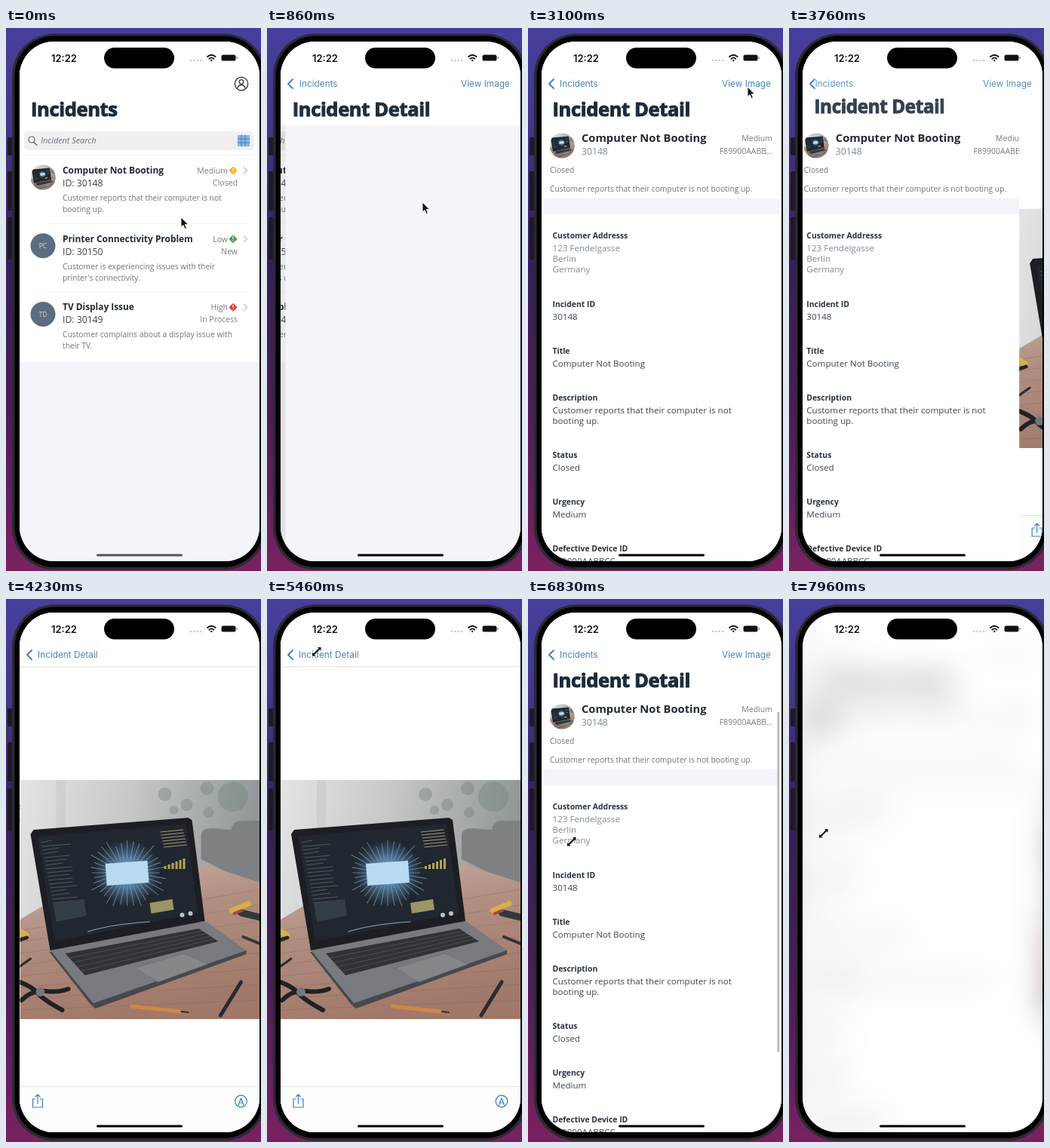
Animation of 338 by 720 pixels, one loop 8000 ms. Source, as an HTML page:

```html
<!DOCTYPE html>
<html lang="en">
<head>
<meta charset="utf-8">
<title>Incidents app</title>
<style>
html, body { margin: 0; width: 100%; height: 100%; overflow: hidden; background: #2c1b4e; }
svg { display: block; width: 100%; height: 100%; }
text { font-family: "Open Sans", "Noto Sans", sans-serif; fill: #3a4450; white-space: pre; }
.big { font-size: 25.6px; font-weight: 700; letter-spacing: -.4px; fill: #1d2b3a; stroke: #1d2b3a; stroke-width: 1px; }
.name { font-size: 11.9px; font-weight: 700; fill: #1f2b38; }
.head { font-size: 14.7px; font-weight: 700; fill: #1f2b38; }
.id { font-size: 12.2px; }
.small { font-size: 10.3px; fill: #6c747c; }
.side { font-size: 10.5px; fill: #737b83; text-anchor: end; }
.label { font-size: 10.4px; font-weight: 700; fill: #27323e; }
.value { font-size: 11.6px; }
.muted { fill: #7b8997; }
.search { font-size: 10.9px; font-style: italic; fill: #6a7078; }
.init { font-size: 8.5px; fill: #d3dae2; text-anchor: middle; }
.link { font: 11.8px Inter, sans-serif; fill: #4583ba; }
.clock { font: 600 13px Inter, sans-serif; fill: #111; }
.line { fill: none; stroke-linecap: round; stroke-linejoin: round; }
</style>
</head>
<body>
<svg id="stage" viewBox="0 0 338 720" preserveAspectRatio="none"></svg>
<script>
const svg = document.getElementById('stage');
const text = (x, y, cls, s) => `<text x="${x}" y="${y}" class="${cls}">${s}</text>`;
const rect = (x, y, w, h, fill, more = '') => `<rect x="${x}" y="${y}" width="${w}" height="${h}" fill="${fill}" ${more}/>`;
const circle = (x, y, r, fill, more = '') => `<circle cx="${x}" cy="${y}" r="${r}" fill="${fill}" ${more}/>`;
const poly = (points, fill, more = '') => `<polygon points="${points}" fill="${fill}" ${more}/>`;
const line = (d, color, w, more = '') => `<path class="line" d="${d}" stroke="${color}" stroke-width="${w}" ${more}/>`;
const group = (id, body, more = '') => `<g id="${id}" ${more}>${body}</g>`;

let seed = 7;
const random = () => (seed = seed * 16807 % 2147483647) / 2147483647;

function photo() {
  let s = rect(18, 240, 318, 317, 'url(#wall)') + rect(66, 240, 12, 120, '#c3c7c9', 'opacity=".5"');
  for (const [x, y, r] of [[210, 259, 9], [239, 273, 8], [266, 251, 9], [268, 283, 7], [300, 262, 20], [222, 280, 6]])
    s += circle(x, y, r, '#718277', 'opacity=".4"');
  s += '<path d="M258 345V314q0-10 14-10l26 2q2-12 14-12h24v90z" fill="#7d8184"/>';
  s += poly('18,425 60,400 262,352 336,376 336,557 18,557', 'url(#wood)');
  for (let i = 0; i < 9; i++)
    s += line(`M18 ${440 + i * 15}L336 ${385 + i * 21}`, '#7c5a4e', .7, 'opacity=".4"');
  s += poly('57,468 262,428 318,466 318,471 118,543 112,538', '#46484d');
  s += poly('57,464 262,426 318,466 115,536', '#787a7f');
  s += poly('78,470 255,437 281,454 104,499', '#303236');
  for (let i = 1; i < 5; i++)
    s += line(`M${78 + i * 5} ${470 + i * 6}L${255 + i * 5} ${437 + i * 3.4}`, '#5d6065', .6);
  s += poly('171,489 236,470 267,484 201,508', '#85878b', 'stroke="#696b70" stroke-width=".6"');
  s += poly('36,306 241,290 246,293 263,427 58,466 32,312', '#1c1e23');
  s += poly('41,315 238,298 254,416 64,454', '#20272e');
  const screen = [];
  for (let i = 0; i < 17; i++) {
    const x = 46 + i, y = 323 + i * 5;
    screen.push(line(`M${x} ${y}l${14 + random() * 26} -3`, '#8b959a', .8, 'opacity=".6"'));
  }
  for (let i = 0; i < 36; i++) {
    const a = i * Math.PI / 18, c = Math.cos(a), d = Math.sin(a), r = 42 + random() * 14;
    screen.push(line(`M${160 + c * 26} ${363 + d * 19}L${160 + c * r} ${363 + d * r * .85}`, '#8ba5b8', 1.1, 'opacity=".65"'));
  }
  for (let i = 0; i < 6; i++)
    screen.push(line(`M${204 + i} ${309 + i * 4}l30 -3`, '#a29a78', 1), rect(209 + i * 5, 354 - i * 2, 3, 4 + i * 2, '#b0a25a'));
  s += screen.join('');
  s += poly('190,403 220,398 222,412 192,417', '#9c9566') + poly('62,404 103,398 106,420 66,428', '#333f44');
  s += line('M108 441Q140 431 190 428', '#8ba3b1', 1.2) + circle(233, 419, 3, '#b8c0c6') + circle(244, 417, 3, '#b8c0c6');
  s += circle(160, 363, 44, 'url(#glow)') + rect(132, 349, 56, 29, '#b9daf3', 'transform="rotate(-4 160 363)"');
  s += line('M18 441l8 5', '#d9b04a', 8) + line('M18 452l9 -3', '#272525', 5) + line('M18 487l14 -10', '#2b2b2d', 3);
  s += line('M18 508Q34 514 42 523T74 545M20 532Q34 518 52 520T82 517', '#202124', 6) + circle(45, 521, 6, '#74777b');
  s += line('M166 540L230 547', '#cf8843', 5) + line('M232 547l9 1', '#3a302a', 2);
  s += line('M311 508L284 552', '#292b31', 5) + line('M311 416l25 6', '#33363b', 9);
  s += line('M299 413l22 -9', '#d6ae4a', 7) + line('M302 417l10 -4', '#a8483f', 4) + line('M314 448l22 9', '#33343a', 4);
  return s;
}

const avatar = (x, y) => `<g transform="translate(${x} ${y})"><g clip-path="url(#round)">
  <use href="#photo" transform="scale(.112) translate(-165 -400)"/></g></g>`;

function row(i, name, id, desc, urgency, color, status, initials) {
  return group('row' + i,
    (initials ? circle(49, 198, 16.5, '#5d6d81') + text(49, 201.5, 'init', initials) : avatar(49, 198)) +
    text(75, 193, 'name', name) + text(75, 210, 'id', 'ID: ' + id) +
    desc.map((d, k) => text(75, 229 + k * 15, 'small', d)).join('') +
    text(294, 193, 'side', urgency) + text(307, 209, 'side', status) +
    rect(297, 185, 8, 8, color, 'rx="1" transform="rotate(45 301 189)"') +
    line('M301 186v3M301 191.5v.2', '#fff', 1.2) + line('M315.5 185l4 4-4 4', '#b7bbc0', 1.2) +
    (i < 2 ? rect(55, 259, 268, .7, '#ededf0') : ''), `transform="translate(0 ${i * 90.7})"`);
}

const listBody = rect(18, 18, 318, 690, '#f4f4fb') + rect(18, 18, 318, 425, '#fff') +
  rect(24, 137, 305, 25, '#f0f0f1', 'rx="5"') + rect(18, 168, 318, .7, '#ededf0') +
  circle(34, 148, 4, 'none', 'stroke="#555c64" stroke-width="1.2"') + line('M37 151.5l4 4', '#555c64', 1.2) +
  text(46, 153, 'search', 'Incident Search') +
  rect(307, 142, 16, 15, '#8db6e8') + line('M307 147h16M307 152h16M312 142v15M317 142v15', '#3f7cc9', 1) +
  row(0, 'Computer Not Booting', 30148, ['Customer reports that their computer is not', 'booting up.'], 'Medium', '#efb52e', 'Closed') +
  row(1, 'Printer Connectivity Problem', 30150, ['Customer is experiencing issues with their', 'printer\'s connectivity.'], 'Low', '#4d9a4b', 'New', 'PC') +
  row(2, 'TV Display Issue', 30149, ['Customer complains about a display issue with', 'their TV.'], 'High', '#dc4234', 'In Process', 'TD') +
  rect(18, 18, 318, 690, '#000', 'id="listDim"');

const fields = [
  [279, 'Customer Addresss', ['123 Fendelgasse', 'Berlin', 'Germany'], 'muted'],
  [370, 'Incident ID', ['30148']],
  [432, 'Title', ['Computer Not Booting']],
  [494, 'Description', ['Customer reports that their computer is not', 'booting up.']],
  [570, 'Status', ['Closed']],
  [632, 'Urgency', ['Medium']],
  [694, 'Defective Device ID', ['F89900AABBCC']]
].map(([y, label, lines, cls = '']) => text(32.5, y, 'label', label) +
  lines.map((s, k) => text(32.5, y + 16.5 + k * 14.4, 'value ' + cls, s)).join('')).join('');

const detailBody = rect(18, 18, 318, 690, '#f4f4fb') + group('record',
  rect(18, 18, 318, 690, '#fff') + avatar(45, 156) +
  text(71, 151, 'head', 'Computer Not Booting') + text(71, 168, 'id muted', '30148') +
  text(324, 150, 'side', 'Medium') + text(324, 166.5, 'side', 'F89900AABB...') +
  text(29, 192, 'small', 'Closed') + text(29, 217, 'small', 'Customer reports that their computer is not booting up.') +
  rect(21, 226, 312, 21, '#f3f3fa') + fields + rect(330.5, 150, 2.5, 451, '#b4b4b8', 'rx="1.2" id="scrollbar"'));

const blue = '#3c7cc4';
const photoBody = rect(18, 18, 318, 690, '#fff') + rect(18, 89.5, 318, .8, '#dcdce0') +
  group('photo', photo(), 'clip-path="url(#picture)"') + rect(18, 646, 318, 62, '#fdfdfd') + rect(18, 646, 318, .8, '#dcdce0') +
  line('M38 663h-3v11h13v-11h-3M41.5 669v-12M38.5 660l3-3 3 3', blue, 1.2) +
  circle(311, 666, 7.8, 'none', `stroke="${blue}" stroke-width="1.2"`) + line('M307.5 671l3.5-9 3.5 9M309 668h4', blue, 1.2);

const nav = rect(18, 18, 318, 111, '#fff', 'id="navBar"') +
  group('listTitle', text(0, 0, 'big', 'Incidents')) +
  group('person', circle(312, 74, 8.7, 'none', 'stroke="#34404e" stroke-width="1.4"') +
    circle(312, 71.5, 2.8, 'none', 'stroke="#34404e" stroke-width="1.3"') + line('M307 79.5q1-4 5-4t5 4', '#34404e', 1.3)) +
  group('detailTitle', text(0, 0, 'big', 'Incident Detail')) +
  group('backToList', text(42, 78, 'link', 'Incidents')) +
  group('viewImage', text(257, 78, 'link', 'View Image')) +
  group('backToDetail', text(42, 78, 'link', 'Incident Detail')) +
  group('chevron', line('M34 68l-6 6 6 6', blue, 1.8));

const status = text(60, 44.5, 'clock', '12:22') + rect(130, 26, 93, 27.5, '#000', 'rx="13.7"') +
  [0, 1, 2, 3].map(i => circle(245 + i * 4.4, 43, 1.2, '#c3c3c6')).join('') +
  line('M267 38q5.3-4.6 10.6 0M269.3 40.7q3-2.6 6 0', '#111', 1.8) + circle(272.3, 43, 1.2, '#111') +
  rect(285.5, 35.5, 19, 8, '#111', 'rx="2.6"') + rect(305.5, 38, 1.3, 3, '#888', 'rx=".6"') +
  rect(120, 697.5, 114, 3, '#000', 'rx="1.5" id="home"');

svg.innerHTML = `<defs>
  <linearGradient id="desk" x2="0" y2="1"><stop stop-color="#463f9c"/><stop offset=".18" stop-color="#423689"/>
    <stop offset=".42" stop-color="#34205c"/><stop offset=".7" stop-color="#4a1d55"/><stop offset="1" stop-color="#7a2260"/></linearGradient>
  <linearGradient id="wall" y2=".2"><stop stop-color="#e2e4e5"/><stop offset=".45" stop-color="#c6c9ca"/><stop offset="1" stop-color="#8f9496"/></linearGradient>
  <linearGradient id="wood" x2=".3" y2="1"><stop stop-color="#c9b3a8"/><stop offset=".45" stop-color="#b08e80"/><stop offset="1" stop-color="#a1796a"/></linearGradient>
  <radialGradient id="glow"><stop offset=".3" stop-color="#7db4e4" stop-opacity=".8"/><stop offset="1" stop-color="#4b7cab" stop-opacity="0"/></radialGradient>
  <clipPath id="screen"><rect x="18" y="18" width="318" height="689" rx="46"/></clipPath>
  <clipPath id="picture"><rect x="18" y="240" width="318" height="317"/></clipPath>
  <clipPath id="round"><circle r="16.5"/></clipPath></defs>` +
  rect(0, 0, 338, 720, 'url(#desk)') +
  [[145, 24], [190, 52], [251, 56]].map(([y, h]) => rect(2, y, 8, h, '#1d1a26', 'rx="2"')).join('') +
  rect(8, 7.5, 337, 711, '#2b2a33', 'rx="56"') +
  rect(11.5, 10.5, 330, 704.5, '#000', 'rx="53"') +
  `<g clip-path="url(#screen)">${rect(18, 18, 318, 690, '#fff')}` +
  group('app', group('list', listBody) + group('detail', detailBody) + group('photoPage', photoBody) + nav) +
  status + '</g>' +
  group('arrow', '<path d="M0 0v13l3-2.6 2.2 5 2.2-1-2.2-4.8h4.2z" fill="#111" stroke="#fff" stroke-width=".9"/>') +
  group('resize', '<path d="M6-6.5v6l-2-2L-2.500 4l2 2h-6V0l2 2L2-4.500l-2-2z" fill="#111" stroke="#fff" stroke-width=".9"/>');

const el = {};
svg.querySelectorAll('[id]').forEach(n => el[n.id] = n);

const clamp = v => Math.max(0, Math.min(1, v));
const mix = (a, b, p) => a + (b - a) * p;
const ramp = (t, a, b) => clamp((t - a) / (b - a));
const move = (id, x, y = 0, s = 1) => el[id].setAttribute('transform', `translate(${x} ${y}) scale(${s})`);
const fade = (id, o) => el[id].setAttribute('opacity', clamp(o));
const spring = ms => { const k = Math.max(0, ms) * .0174; return 1 - (1 + k) * Math.exp(-k); };

const pointer = [[0, 232, 251], [30, 232, 251], [520, 206, 231], [2060, 206, 231], [2900, 291, 78], [4660, 291, 78],
  [5400, 66, 70], [5900, 66, 70], [6650, 58, 322], [6850, 58, 322], [7230, 46, 311], [8000, 46, 311]];

function pointerAt(t) {
  const i = pointer.findIndex(k => k[0] > t), [t0, x0, y0] = pointer[i - 1], [t1, x1, y1] = pointer[i];
  const p = ramp(t, t0, t1), e = p * p * (3 - 2 * p);
  return [mix(x0, x1, e), mix(y0, y1, e)];
}

// Shrinks a large title into the back-button label.
const shrinkTitle = (id, x, p) => move(id, mix(x, 42, p), mix(117, 78, p), 1 - .54 * p);

function draw(t) {
  const opened = spring(t - 525);
  const held = t > 3760 && t < 4060 ? 3760 : t;
  const shown = t < 5525 ? spring(held - 3730) : 1 - spring(t - 5525);

  move('list', -98 * opened);
  fade('listDim', .08 * opened);
  move('detail', 318 * (1 - opened) - 95 * shown);
  move('photoPage', 318 * (1 - shown));
  fade('record', t >= 1250 ? 1 : 0);
  fade('scrollbar', t < 4000 ? 1 - ramp(t, 1500, 1740) : ramp(t, 6020, 6150) - ramp(t, 6950, 7160));

  el.navBar.setAttribute('height', 111 - 40 * shown);
  shrinkTitle('listTitle', 33, opened);
  fade('listTitle', 1 - opened * 1.6);
  fade('person', 1 - opened * 1.5);
  shrinkTitle('detailTitle', 32.5 + 60 * (1 - opened), shown);
  fade('detailTitle', opened * (1 - shown * 1.1));
  move('backToList', 40 * (1 - opened) - 78 * shown);
  fade('backToList', opened * opened * (1 - shown * 1.5));
  fade('viewImage', opened * (1 - shown) * (t > 3490 && t < 3730 ? .4 : 1));
  fade('backToDetail', shown * shown);
  fade('chevron', opened);
  el.home.setAttribute('fill', t < 525 ? '#555' : '#000');

  const haze = t < 7960 ? .7 * ramp(t, 7430, 7630) : 1;
  el.app.style.filter = haze ? `blur(${20 * haze}px)` : 'none';
  fade('app', 1 - .45 * haze);

  const [x, y] = pointerAt(t);
  move('arrow', x, y);
  move('resize', x, y);
  fade('arrow', t < 3730 ? 1 : 0);
  fade('resize', t >= 4660 ? 1 : 0);
}

const start = performance.now();
function tick() {
  draw((performance.now() - start) % 8000);
  requestAnimationFrame(tick);
}
tick();
</script>
</body>
</html>
```
